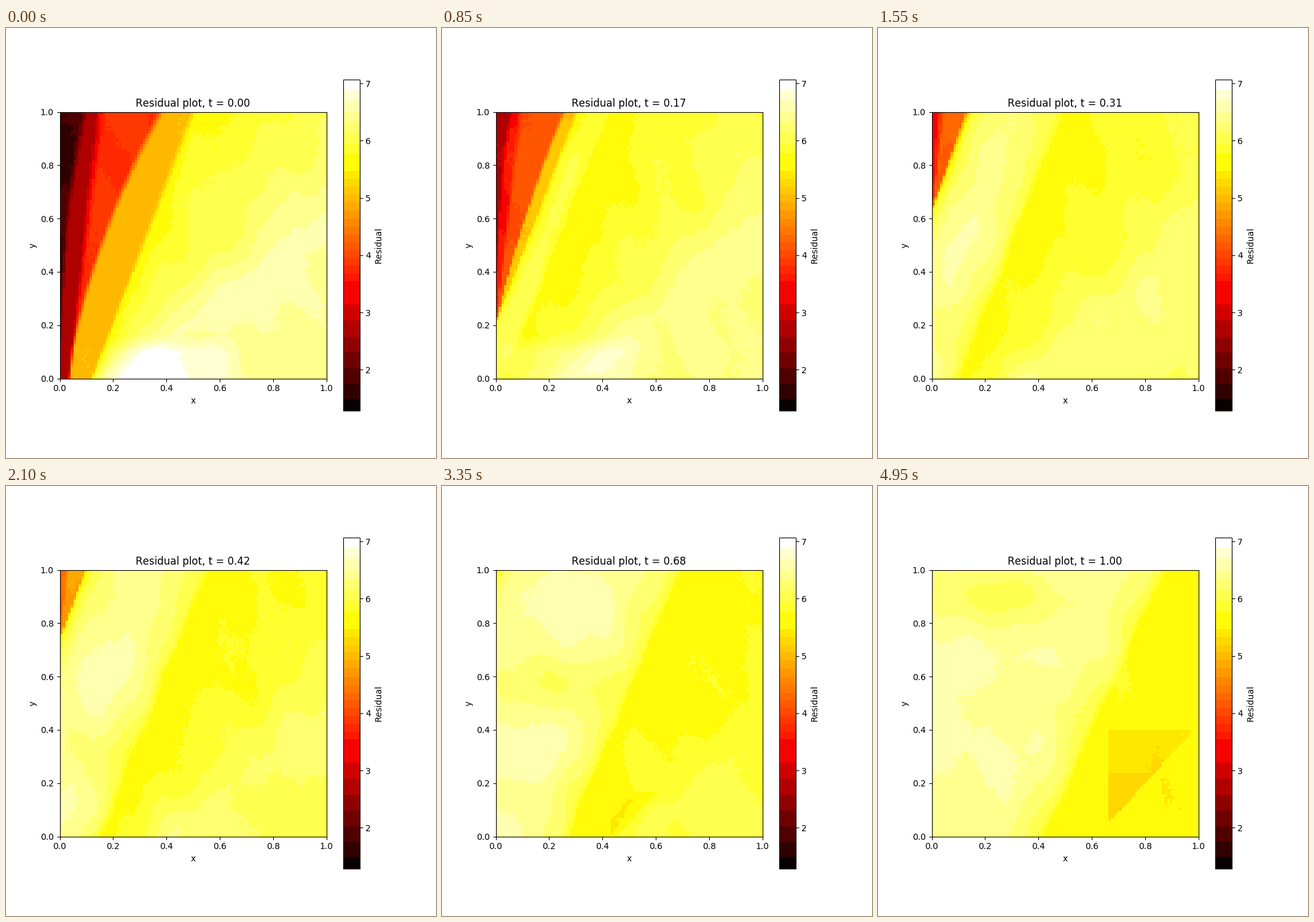
These frames come from a looping animation (700x700 px, 5000 ms). A matplotlib script:

```python
import numpy as np
import matplotlib.pyplot as plt
from matplotlib.animation import FuncAnimation
from matplotlib.colors import ListedColormap

FRAMES = 100
GRID = 100
VMIN, VMAX = 1.284, 7.067

plt.rcParams["text.kerning_factor"] = 6

cell = (np.arange(GRID) + 0.5) / GRID
x, y = np.meshgrid(cell, cell)

rng = np.random.default_rng(7)
waves = np.column_stack([rng.normal(0, 14, (14, 2)), rng.uniform(0, 2 * np.pi, 14)])
grain = rng.normal(0, 0.06, (GRID, GRID))


def banded_hot():
    """Hot colour map reduced to flat bands, plus the value at each band's centre."""
    rgb = plt.get_cmap("hot", 256)(np.arange(256))[:, :3]
    bins = np.floor(rgb * 255 / [32, 16, 32])
    band = np.r_[0, np.cumsum(np.any(np.diff(bins, axis=0) != 0, axis=1))]
    count = band[-1] + 1
    colors = np.array([rgb[band == k].mean(axis=0) for k in range(count)])
    colors[0], colors[-1] = (0.03, 0, 0), (1, 1, 1)
    centers = np.array([np.flatnonzero(band == k).mean() for k in range(count)])
    values = VMIN + (centers + 0.5) / 256 * (VMAX - VMIN)
    return ListedColormap(colors[band]), values


def below(v, edge, width):
    """1 well below the edge, 0 above it, with a short linear ramp."""
    return np.clip((edge - v) / width + 0.5, 0, 1)


def bump(v, center, width):
    return np.exp(-(((v - center) / width) ** 2))


def facets(t):
    """Faceted noise that drifts up and to the right."""
    total = 0
    for kx, ky, phase in waves:
        total = total + np.arcsin(np.sin(kx * (x - 0.5 * t) + ky * (y - t) + phase))
    return total / np.sqrt(len(waves))


def ahead(d, t):
    """Fan of rays to the right of the front, flattening with time."""
    ray = d / (y + 0.3)
    rise = np.interp(ray, [0, 0.12, 0.3, 0.5, 0.6, 0.85, 1.2, 2.2],
                     [0, 0.1, 0.3, 0.45, 0.65, 1, 0.9, 0.85])
    return 22 + 5 * (1 - t) * rise


def behind(t):
    """Bright side: two light lobes and a dim one that rise with time."""
    s = y - t
    light = bump(s, 0.22, 0.13) * bump(x, 0.25, 0.2) + bump(s, -0.38, 0.14) * bump(x, 0.1, 0.17)
    dim = bump(s, -0.1, 0.11) * bump(x, 0.25, 0.22)
    level = 26.1 + 0.9 * light - 2 * min(1, 1.2 * t) * dim - 5 * np.clip(s - 0.45, 0, 1)
    return 24 + (level - 24) * min(1, 0.2 + 3 * t)


def cliff(t):
    """Distance outside the dark corner, and the drop in levels inside it."""
    top = np.interp(t, [0, 0.17, 0.31, 0.55, 0.83, 1], [0.51, 0.31, 0.145, 0.05, -0.05, -0.15])
    edge = top - 0.39 * (1 - y)
    q = np.where(edge > 0.002, x / np.maximum(edge, 0.002), 9)
    shelf = np.maximum(0.3, 0.74 + 0.5 * t - 0.5 * (1 - y) * max(0, 1 - 2.5 * t))
    drop = (4 * below(q, 0.98, 0.06) + 8.5 * below(q, shelf, 0.06)
            + 4.5 * below(q, 0.3, 0.08) + 3.5 * below(q, 0.18 * y ** 1.5, 0.06))
    fade = np.interp(t, [0, 0.17, 0.31, 0.55], [1, 0.82, 0.76, 0.1])
    return np.maximum(x - edge, 0), fade * drop


def wedge(t):
    """Late orange triangle, growing away from its sloping side."""
    x0, top, foot = 0.66 - 0.7 * (1 - t), 0.4 - 0.7 * (1 - t), 0.05 - 0.2 * (1 - t)
    slant = y - foot - 1.1 * (x - x0)
    inside = np.minimum(np.minimum(x - x0, top - y), slant)
    shown = (inside > 0) & (slant < 1.5 * (t - 0.62))
    core = shown & (y < top - 0.16) & (t > 0.75)
    return shown * 1.2 + core * 0.8


def residual(t):
    front = -0.05 + 0.47 * t + (0.37 + 0.08 * t + 0.13 * np.exp(-12 * t)) * y
    d = x - front
    mix = np.interp(d, [-0.18, -0.06, -0.03, 0.01], [0, 0.35, 0.5, 1])
    level = behind(t) * (1 - mix) + ahead(np.maximum(d, 0), t) * mix

    pool = below(y, 0.13, 0.06) * below(np.abs(x - 0.37 + 0.6 * t), 0.25, 0.1)
    level += 2.2 * np.clip(1.8 - 6 * t, 0, 1) * pool

    gap, drop = cliff(t)
    level = 22 + (level - 22) * (1 - np.exp(-gap / 0.04))
    level += 0.3 * facets(t) + grain - drop - wedge(t)
    return np.interp(level, np.arange(len(values)), values)


cmap, values = banded_hot()
fig, ax = plt.subplots(figsize=(7, 7), dpi=100)
image = ax.imshow(residual(0), origin="lower", extent=(0, 1, 0, 1), cmap=cmap,
                  vmin=VMIN, vmax=VMAX, interpolation="nearest")
fig.colorbar(image, label="Residual")
ax.set_xlabel("x")
ax.set_ylabel("y")
title = ax.set_title("Residual plot, t = 0.00")


def update(i):
    t = i / (FRAMES - 1)
    image.set_data(residual(t))
    title.set_text(f"Residual plot, t = {t:.2f}")
    return image, title


anim = FuncAnimation(fig, update, frames=FRAMES, interval=50, repeat=True)
plt.show()
```
